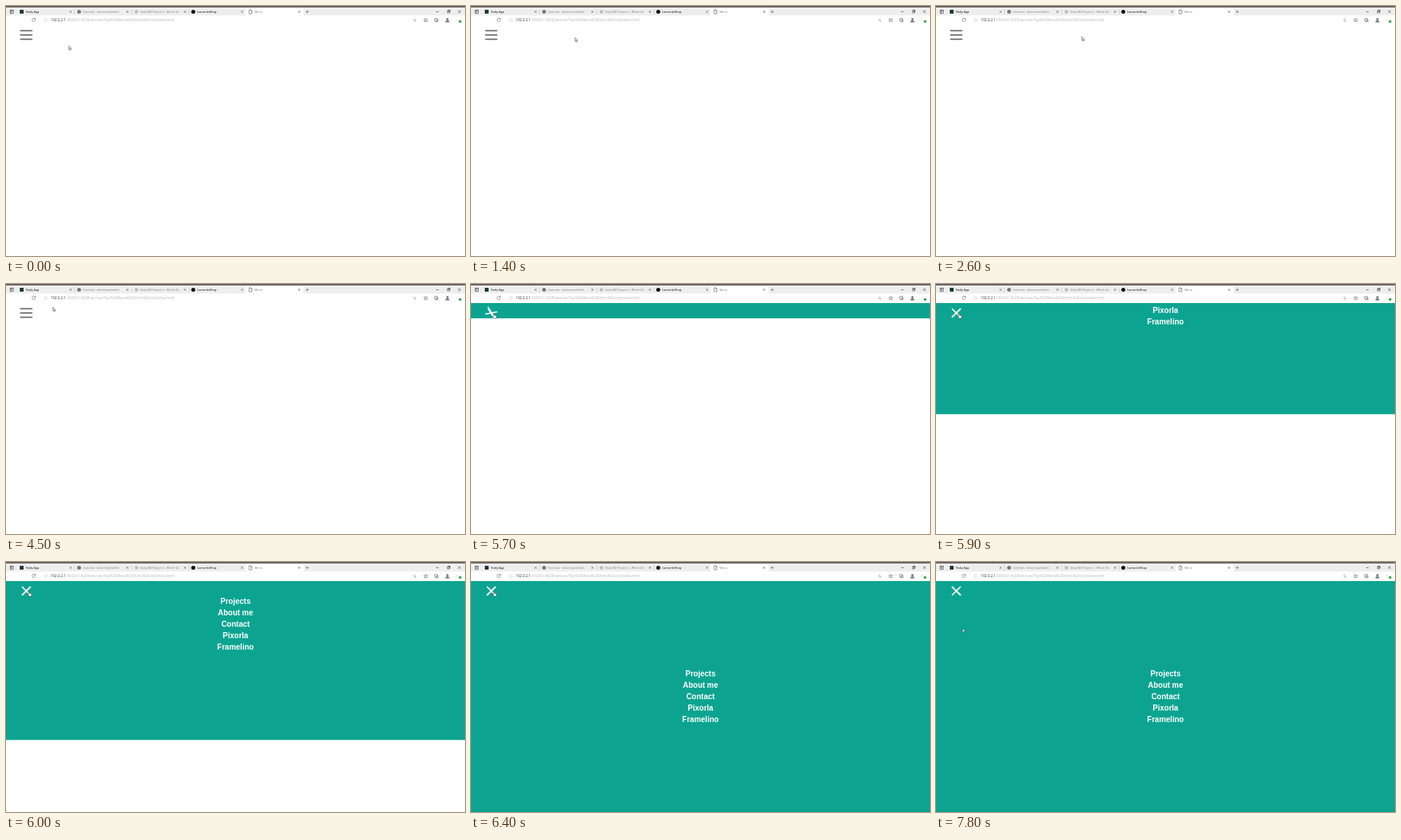
An HTML page for the animation above (8 s loop, 600x328 px).

```html
<!DOCTYPE html>
<html lang="en">
<head>
<meta charset="utf-8">
<title>Menu</title>
<style>
  html, body { margin: 0; width: 100%; height: 100%; overflow: hidden; background: #fff; }
  svg { display: block; width: 600px; height: 328px; }
  .ui { font: 3.7px "Open Sans", "Noto Sans", sans-serif; fill: #777; }
  .dark { fill: #333; font-weight: 600; }
  .url { font-size: 4.6px; fill: #b5b5b5; }
  .menu { font: bold 10px "Liberation Sans", Arial, sans-serif; fill: #fff; text-anchor: middle; }
  .icon { fill: none; stroke: #555; stroke-width: .6; }
</style>
</head>
<body>
<svg viewBox="0 0 600 328">
  <g id="panel">
    <rect y="25" width="600" height="303" fill="#0ca490"/>
    <g class="menu">
      <text x="300" y="150">Projects</text>
      <text x="300" y="165">About me</text>
      <text x="300" y="180">Contact</text>
      <text x="300" y="195">Pixorla</text>
      <text x="300" y="210">Framelino</text>
    </g>
  </g>

  <g id="browser">
    <rect width="600" height="25" fill="#fff"/>
    <rect width="600" height="12.4" fill="#efeeee"/>
    <rect width="600" height="2" fill="#6b6767"/>
    <rect x="313" y="2.6" width="76" height="10" fill="#fff"/>
    <path d="M89.5 4v7M164.5 4v7M239.5 4v7" stroke="#c4c4c4" stroke-width=".6"/>

    <rect x="18" y="5" width="5" height="5" fill="#20383d"/>
    <circle cx="95.5" cy="7.5" r="2.5" fill="#777"/>
    <circle cx="170.5" cy="7.5" r="2.3" fill="#bbb"/>
    <circle cx="244.8" cy="7.5" r="2.6" fill="#111"/>
    <g class="ui">
      <text class="dark" x="26" y="8.9">Vexly App</text>
      <text x="100.5" y="8.9">Commits · tolvenmar/which</text>
      <text x="175.5" y="8.9">Vexly ND Project 2 - Which On</text>
      <text class="dark" x="250" y="8.9">LumoriteShop</text>
      <text x="325" y="8.9">Menu</text>
      <text class="url" x="58.5" y="20.1"><tspan fill="#333">192.0.2.1</tspan>:4300/01.%20Exercises/Top%20Menu%20(html,%20css)/index.html</text>
    </g>

    <g class="icon">
      <path id="closers" stroke="#333"/>
      <path d="M5.5 5.3h4v4.4h-4zM5.5 6.2h4M7 6.2v3.5" stroke="#333"/>
      <path d="M317.8 5h2.2l1.4 1.4v3.8h-3.6zM320 5v1.4h1.4"/>
      <path d="M391.8 7.5h4M393.8 5.5v4"/>
      <path d="M562.3 7.5h3.2M577 6.3h2.6v2.6h-2.6zM577.8 6.3v-.8h2.6v2.6h-.8M591.2 5.9l3 3M594.2 5.9l-3 3" stroke="#222"/>
      <path d="M38.2 17a2.2 2.2 0 1 0 .3 1.6M38.6 15.8v1.5h-1.5"/>
      <g stroke="#ccc"><circle cx="52" cy="18.5" r="2.1"/><path d="M52 18v1.5"/></g>
      <path d="M532.5 17h3M532.5 18.6h1.5M535 18.2v2.5M533.8 19.5h2.5" stroke="#999"/>
      <path d="M548.6 16l.8 1.6 1.7.2-1.2 1.2.3 1.8-1.6-.9-1.6.9.3-1.8-1.2-1.2 1.7-.2z"/>
      <path d="M560.5 16.3h3v3h-3zM561.7 19.3v1.4h3v-3h-1.2"/>
      <path d="M588.5 18h.7M590.3 18h.7" stroke="#777"/>
    </g>
    <g fill="#777"><circle cx="577" cy="17.2" r="1.5"/><path d="M574.4 21.4a2.6 2.6 0 0 1 5.2 0z"/></g>
    <circle cx="593.6" cy="20.2" r="1.8" fill="#2ba84a"/>
  </g>

  <g id="burger" stroke-width="1.7">
    <path class="bar" d="M-8 0H8"/>
    <path class="bar side" d="M-8 0H8"/>
    <path class="bar side" d="M-8 0H8"/>
  </g>

  <g id="cursor" fill="#fff" stroke="#444" stroke-width=".6" stroke-linejoin="round">
    <path id="arrow" d="M.3 .3V5.2L1.5 4.2L2.3 6L3.1 5.6L2.3 3.9H3.9Z"/>
    <path id="hand" d="M.7 .4Q1.3 0 1.7 .6V2.6L4 3.1Q4.6 3.3 4.5 4L4 6.8H1.5L-.5 4.4Q-.4 3.6 .6 4.1Z"/>
  </g>
</svg>
<script>
const LOOP = 8000, STEP = 100;
const $ = id => document.getElementById(id);
const clamp = v => Math.min(1, Math.max(0, v));
const sides = document.querySelectorAll(".side");

$("closers").setAttribute("d", [84.5, 158.7, 234, 308.5, 383.3]
  .map(x => `M${x - 1.2} 6.3l2.4 2.4m0-2.4l-2.4 2.4`).join(""));

// CSS-style cubic-bezier easing, solved by bisection
function bezier(x1, y1, x2, y2) {
  const at = (s, a, b) => 3 * (1 - s) ** 2 * s * a + 3 * (1 - s) * s * s * b + s ** 3;
  return x => {
    let lo = 0, hi = 1;
    for (let i = 0; i < 24; i++) {
      const mid = (lo + hi) / 2;
      if (at(mid, x1, x2) < x) lo = mid; else hi = mid;
    }
    return at(hi, y1, y2);
  };
}
const ease = bezier(.25, .1, .25, 1);
const slide = bezier(.303, .016, .4, 1);
const tween = (t, start, length, curve) => {
  const x = clamp((t - start) / length);
  return x === 0 || x === 1 ? x : curve(x);
};

// Pointer route: time, x, y
const route = [
  [0, 81.7, 52], [900, 81.7, 52], [1800, 174.3, 33.5], [2200, 188, 21.5],
  [2600, 190.4, 40], [3400, 190.4, 40], [3500, 244.5, 167.5], [3600, 244.5, 167.5],
  [4500, 61, 30.3], [4600, 61, 30.3], [5100, 29, 38.3], [7000, 29, 38.3],
  [7800, 34.4, 87], [LOOP, 34.4, 87]
];
function pointer(t) {
  const i = route.findIndex(k => k[0] > t);
  const [t0, x0, y0] = route[i - 1], [t1, x1, y1] = route[i];
  const u = (t - t0) / (t1 - t0), e = u * u * (3 - 2 * u);
  return [x0 + (x1 - x0) * e, y0 + (y1 - y0) * e];
}

function draw(t) {
  const drop = tween(t, 5600, 800, slide);
  $("panel").setAttribute("transform", `translate(0 ${303 * (drop - 1)})`);

  // Opening spins the icon to 225deg; leaving it turns back to 135deg
  const open = tween(t, 5600, 220, ease);
  const leave = tween(t, 7200, 400, ease);
  $("burger").setAttribute("transform", `translate(26.5 38) rotate(${225 * open - 90 * leave})`);
  $("burger").setAttribute("stroke", open > 0 ? "#fff" : "#666");
  sides.forEach((bar, i) => {
    const y = (i ? 5.6 : -5.6) * (1 - open);
    bar.setAttribute("transform", `translate(0 ${y}) rotate(${90 * open})`);
  });

  const [x, y] = pointer(t);
  const over = x > 18 && x < 36 && y > 30 && y < 46;
  $("cursor").setAttribute("transform", `translate(${x} ${y})`);
  $("hand").style.display = over ? "" : "none";
  $("arrow").style.display = over ? "none" : "";
}

const start = performance.now();
function tick() {
  const t = (performance.now() - start) % LOOP;
  draw(Math.floor(t / STEP) * STEP);
  requestAnimationFrame(tick);
}
tick();
</script>
</body>
</html>
```
